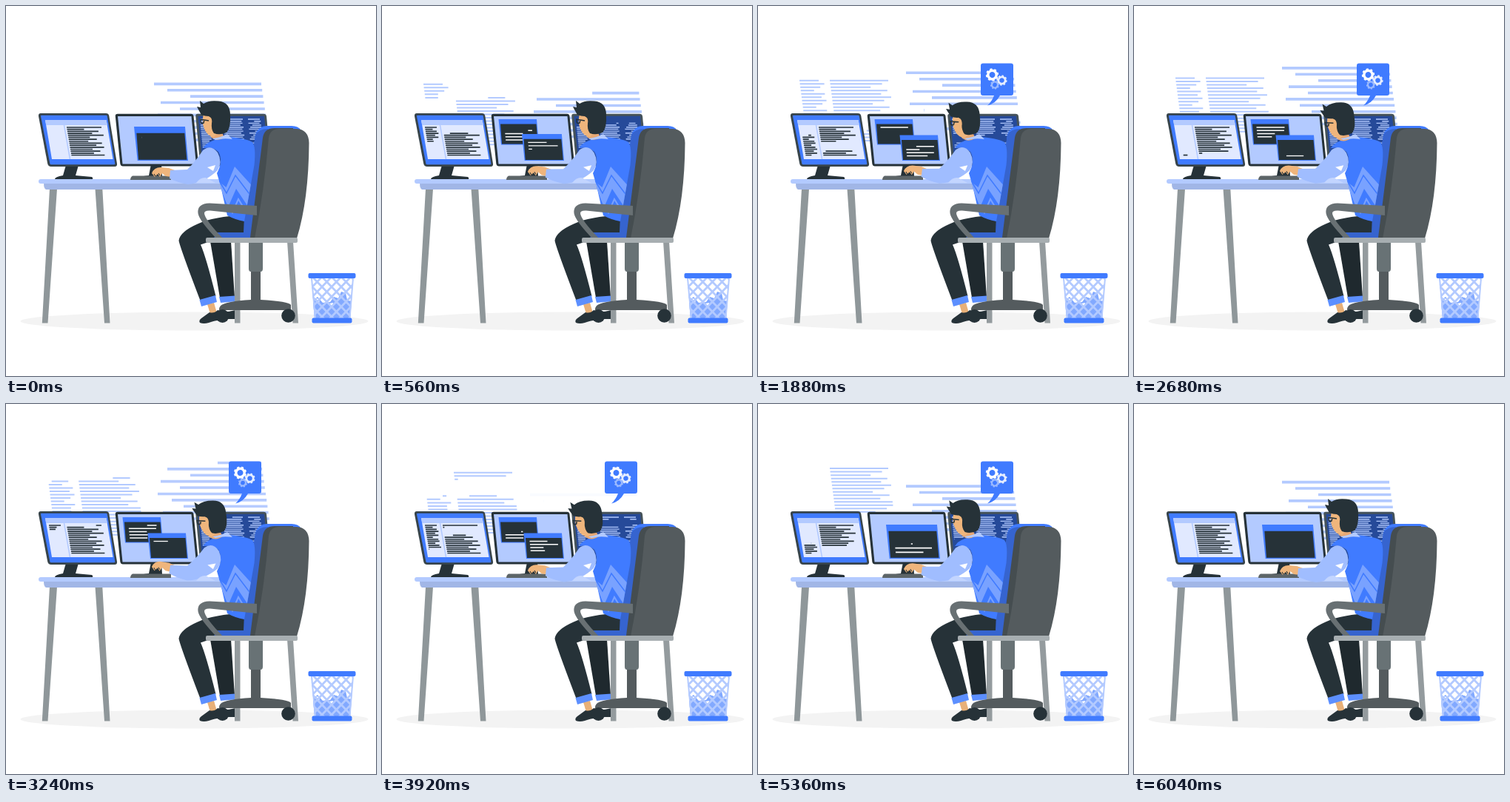
Animation of 500 by 500 pixels, one loop 6080 ms. Source, as an HTML page:

```html
<!DOCTYPE html>
<html lang="en">
<head>
<meta charset="utf-8">
<title>Programmer at a desk</title>
<style>
html, body { margin: 0; width: 100%; height: 100%; overflow: hidden; background: #fff; }
svg { display: block; width: 100vw; height: 100vh; }
</style>
</head>
<body>
<svg id="stage" viewBox="0 0 500 500">
  <defs>
    <clipPath id="basket"><path d="M412 367H469.500L465 423H417Z"/></clipPath>
    <clipPath id="vestClip"><path id="vestShape" d="M270 187Q280 180 297 177Q322 178 333 184Q338 190 335.500 215L322 291Q310 289 299 283L290 243L285 226Q294 209 287 197Q279 190 266 192Z"/></clipPath>
  </defs>

  <ellipse cx="254.500" cy="426" rx="235" ry="12.500" fill="#f3f3f3"/>
  <g id="floatRight"></g>
  <g id="floatLeft"></g>

  <g id="monitors">
    <path d="M81 215H98L94 229L116 231Q118 232 117 234H66Q66 231 77 229Z" fill="#263238"/>
    <path d="M47 145H135Q138.500 145 139.200 148L150 213Q150.500 217 147 217H61Q57 217 56.200 213L44 149Q43.500 145 47 145Z" fill="#37444b"/>
    <path d="M47.500 147.800H135.500Q136.500 147.800 136.800 149L147.300 213Q147.300 214 146.300 214.200H61Q59.800 214.200 59.400 213L47 149Z" fill="#407bff"/>
    <path d="M53 154H135.500L144.500 207H62Z" fill="#e1e9ff"/>
    <path d="M53 154H135.500L137 161H54.200Z" fill="#b3caff"/>
    <path d="M78.500 161L86.500 207" stroke="#b3caff" stroke-width="1.500"/>

    <path d="M196 214H210L211 230H222V234H178Q180 230 193 229Z" fill="#263238"/>
    <path d="M151 145.800H250Q253 145.800 253.500 149L260 213Q260 216.500 257 216.500H158Q155 216.500 154.300 213L147.800 149Q147.500 145.800 151 145.800Z" fill="#263238"/>
    <path d="M151 149H250.500L257 213.500H157.500Z" fill="#b3caff"/>

    <path d="M259 145.800H348Q351.500 145.800 352 149L358 213Q358 216.500 355 216.500H266Q263 216.500 262.300 213L256.300 149Q256 145.800 259 145.800Z" fill="#46535a"/>
    <path d="M259.500 148.800H349L355 213.500H265.500Z" fill="#264a99"/>
  </g>
  <g id="windows"></g>
  <g id="screenText"></g>

  <g id="table">
    <path d="M59 247H69L56.500 428.500H48.800ZM120.500 247H130.300L140.500 428.500H133Z" fill="#8f979a"/>
    <path d="M51 239H300V248H54Q51 247 51 239Z" fill="#a1b6e6"/>
    <rect x="44" y="234" width="262" height="6" rx="3" fill="#b3caff"/>
    <path d="M171 229.500H223V235H168Q168 231 171 229.500Z" fill="#5d6568"/>
  </g>

  <g id="chairBack">
    <path d="M337 174Q341 162 353 162H386Q395 162 399 168L345 313H275Q275 307 283 306L319 304Z" fill="#407bff"/>
    <path d="M337 174Q342 166 354 166L333 313H275Q275 307 283 306L319 304Z" fill="#3664cf"/>
    <path d="M347 178Q349 165 363 165H388L370 313H330Z" fill="#454d50"/>
    <path d="M355 178Q357 166 369 166H393Q409 167 409.500 185Q409 262 393 314H336Q349 250 355 178Z" fill="#545b5e"/>
  </g>

  <g id="rearLeg">
    <path d="M276 318H304L309 394H289Z" fill="#1f292e"/>
    <path d="M288 393L310 391.500L312 399L290 401Z" fill="#5c8fff"/>
    <path d="M287 413Q299 414 310 411L311 423H286Z" fill="#263238"/>
  </g>
  <g id="foot">
    <path d="M272 403L281 401L285 415L276 416Z" fill="#e8b078"/>
    <path d="M275 414Q281 416 286 411L299 414Q300 422 293 424Q281 425 274 428Q267 430 262 428Q260 425 264 422Z" fill="#263238"/>
  </g>
  <path d="M322 283Q281 284 259 294.500Q235 305 233.500 317Q235 326 262.500 398L283.500 392Q270 338 263 322.500L279 317L285 306H321Z" fill="#263238"/>
  <path d="M261.500 397L283 391L285 400L264 406Z" fill="#5c8fff"/>

  <g id="body">
    <use href="#vestShape" fill="#407bff"/>
    <g clip-path="url(#vestClip)">
      <path d="M286 236L297.500 245L309 217L337 248L329 274L311 247L300 272Z" fill="#79a2ff"/>
      <path d="M288 236L298 253L310 229L332 258" fill="none" stroke="#407bff" stroke-width="1.500"/>
      <path d="M297 260L306 279L314 261L328 284" fill="none" stroke="#79a2ff" stroke-width="2"/>
    </g>
  </g>

  <g id="head">
    <path d="M274 168L290 166L295 178Q285 184 277 177Z" fill="#e6a874"/>
    <path d="M267 146Q264 157 268 166Q272 176 281 177L290 168L285 143Z" fill="#efb57c"/>
    <path d="M264 147L260 140L258 136L263 137L262 128L267 132Q274 127 287 128.500Q303 130 303 147Q304 165 298 171Q289 175 281 172Q277 167 278 158Q278 151 274 149Q269 149 264 147Z" fill="#263238"/>
    <ellipse cx="275" cy="156" rx="3.300" ry="6" fill="#efb57c"/>
    <path d="M262 153L274 155M263 153Q262 160 267 158L268 154" fill="none" stroke="#263238" stroke-width="1.500"/>
  </g>
  <path d="M279 179Q290 178 299 173L306 180Q294 178 283 181Z" fill="#b3caff"/>

  <g id="arm">
    <path d="M197 226Q200 218 209 218L220 219L231 223V232L216 230L211 226L208 231L205 227L201 231Z" fill="#efb57c"/>
    <path d="M200 227L202 230M206 226L208 229" stroke="#263238" stroke-width="1"/>
    <path d="M222 222L245 221Q257 209 266 195Q277 186 286 198Q293 211 286 222Q268 239 246 241Q230 238 221 233Z" fill="#a0bdff"/>
    <path d="M272 218L283 215L280 223Z" fill="#fff"/>
  </g>
  <path d="M257 239Q263 231 270 232L283 239Z" fill="#c3d5ff"/>

  <g id="chairFront">
    <path d="M339 270L275 266.500Q258 267 259.500 280Q261 290 285 315H294Q268 288 268 280Q268 276 276 276.500L339 283Z" fill="#687073"/>
    <path d="M309 318H316.500V428.500H309ZM380 318H388L395 428.500H387.500Z" fill="#949b9e"/>
    <path d="M331 355H344V400H331Z" fill="#545b5e"/>
    <path d="M328 319H347V355Q347 359 344 359H331Q328 359 328 355Z" fill="#687275"/>
    <rect x="270" y="313" width="124" height="7" rx="2" fill="#a7aeb1"/>
    <path d="M290 405Q297 399 331 397H344Q382 399 385 404V411H288Q288 407 290 405Z" fill="#545b5e"/>
    <circle cx="292.500" cy="419" r="9" fill="#263238"/>
    <circle cx="381.500" cy="418.500" r="9.300" fill="#263238"/>
  </g>

  <g id="bin">
    <g clip-path="url(#basket)">
      <path d="M415 398L421 393L428 401L438 400L443 393L449 395L453 386L459 388L461 397L469 400V424H415Z" fill="#82a9ff"/>
      <path d="M419 395L424 396L423 402ZM437 402L442 401L441 408ZM461 395L465 394L464 399Z" fill="#fff"/>
      <path id="lattice" fill="none" stroke="#b3caff" stroke-width="2.800"/>
    </g>
    <path d="M413 368L418 422M469 368L464.500 422" stroke="#b3caff" stroke-width="2"/>
    <rect x="408.500" y="361" width="64" height="7" rx="2" fill="#407bff"/>
    <rect x="413.500" y="421.500" width="54" height="7" rx="2" fill="#407bff"/>
  </g>

  <g id="bubble">
    <path d="M304 77.500H342Q345 77.500 345 80.500V118Q345 121 342 121H327Q321 132 310 134.500Q316 129 319 121H304Q301 121 301 118V80.500Q301 77.500 304 77.500Z" fill="#407bff"/>
  </g>
</svg>
<script>
const LOOP = 6080, HALF = LOOP / 2;
const $ = id => document.getElementById(id);
const clamp = v => Math.max(0, Math.min(1, v));
const ease = v => (v = clamp(v), v * v * (3 - 2 * v));
const ramp = (t, from, to) => ease((t - from) / (to - from));
const front = (t, start, linesPerSecond) => Math.max(0, (t - start) * linesPerSecond / 1000);

function add(parent, name, attrs) {
  const el = document.createElementNS('http://www.w3.org/2000/svg', name);
  for (const key in attrs) el.setAttribute(key, attrs[key]);
  return parent.appendChild(el);
}

function track(t, keys) {
  for (let i = 1; i < keys.length; i++) {
    const [t0, a] = keys[i - 1], [t1, b] = keys[i];
    if (t <= t1) return a + (b - a) * ramp(t, t0, t1);
  }
  return keys[keys.length - 1][1];
}

// Rows are [indent, length]; the left margin follows the slant of the screen.
function textBlock(parent, { x, y, step, slant, rows, color, width }) {
  const path = add(parent, 'path', { fill: 'none', stroke: color, 'stroke-width': width });
  const lines = rows.map(([indent, length], i) => [x + indent + slant * step * i, y + step * i, length]);
  const draw = spans => path.setAttribute('d', lines.map(([left, top, length], i) =>
    spans(i).map(([a, b]) => b > a
      ? `M${(left + a * length).toFixed(2)} ${top.toFixed(2)}H${(left + b * length).toFixed(2)}` : '').join('')).join(''));
  return {
    path,
    retype: (typed, erased) => draw(i => {
      const a = clamp(typed - i), b = clamp(erased - i);
      return a >= b ? [[0, 1]] : [[0, a], [b, 1]];
    }),
    show: (typed, erased) => draw(i => [[clamp(erased - i), clamp(typed - i)]])
  };
}

const flush = lengths => lengths.map(length => [0, length]);
const repeat = (list, n) => Array.from({ length: n }, (_, i) => list[i % list.length]);

const rightStarts = [200, 218, 249, 209, 235, 205, 224, 240, 212, 230];
const floatRight = textBlock($('floatRight'), {
  x: 0, y: 0, step: 8.4, slant: 0, color: '#b3caff', width: 3.6,
  rows: rightStarts.map((start, i) => [start, 345 + i * 1.2 - start])
});
const floatStyle = { y: 0, step: 4.52, slant: .13, color: '#b3caff', width: 2 };
const floatNav = textBlock($('floatLeft'), {
  ...floatStyle, x: 56, rows: flush(repeat([26, 33, 27, 18, 32, 27, 33, 27, 18, 32, 26], 19))
});
const floatMain = textBlock($('floatLeft'), {
  ...floatStyle, x: 97, rows: flush(repeat([79, 70, 54, 76, 67, 80, 70, 54, 76, 63, 79], 19))
});

const texts = $('screenText');
const codeStyle = { y: 164, step: 2.68, slant: .17, color: '#263238', width: 1.7 };
const nav = textBlock(texts, {
  ...codeStyle, x: 58, rows: flush(repeat([16, 10, 15, 17, 12, 16, 8, 15], 15))
});
const main = textBlock(texts, {
  ...codeStyle, x: 82, rows: flush([47, 23, 42, 33, 48, 29, 38, 26, 44, 36, 46, 30, 40, 31, 45])
});

const sideStyle = { y: 153, step: 2.68, slant: .1, color: '#b3caff', width: 1.4 };
const sideColumns = [
  textBlock(texts, { ...sideStyle, x: 262, rows: flush(repeat([13, 10, 15, 12, 17], 15)) }),
  textBlock(texts, { ...sideStyle, x: 293, rows: flush(repeat([27, 25, 26, 23], 15)) }),
  textBlock(texts, { ...sideStyle, x: 327, rows: repeat([[0, 16], [8, 9], [0, 15], [5, 12], [2, 15]], 15) })
];

// A console window drawn in its own small coordinates.
function consoleWindow(rows) {
  const group = add($('windows'), 'g', {});
  add(group, 'path', { d: 'M0 0H51.500L54.500 34.500H3.500Z', fill: '#407bff' });
  add(group, 'path', { d: 'M2.500 6.500H51L53.300 33.500H4.500Z', fill: '#263238' });
  const text = textBlock(group, { x: 8, y: 11, step: 4.25, slant: .1, rows, color: '#fff', width: 1.3 });
  return { group, text };
}
const backWindow = consoleWindow(flush([38, 37, 24, 25, 24]));
const frontWindow = consoleWindow(flush([24, 38, 18, 37, 28]));

function gear(cx, cy, r, teeth, fill) {
  const g = add($('bubble'), 'g', {});
  add(g, 'circle', { r: r * .67, fill: 'none', stroke: fill, 'stroke-width': r * .4 });
  add(g, 'circle', {
    r: r * .9, fill: 'none', stroke: fill, 'stroke-width': r * .24, pathLength: teeth * 2, 'stroke-dasharray': '1 1'
  });
  return angle => g.setAttribute('transform', `translate(${cx} ${cy}) rotate(${angle})`);
}
const gears = [
  gear(316.5, 93, 8.5, 8, '#fff'),
  gear(329.5, 100.5, 7, 8, '#e6eeff'),
  gear(320, 106.5, 6, 8, '#9bbaff')
];

let mesh = '';
for (let x = 349; x < 530; x += 13) mesh += `M${x} 366L${x + 56} 424M${x} 366L${x - 56} 424`;
$('lattice').setAttribute('d', mesh);

const headKeys = [[0, 0], [900, 0], [1120, -.6], [1880, -3.8], [2500, -6.3], [4900, -6.5], [5800, 0], [LOOP, 0]];
const handKeys = [[0, 0], [560, 2], [1120, 7], [1880, 3], [2680, 3], [3300, 6], [3920, 1], [4720, 7], [5400, 3], [LOOP, 0]];
const footKeys = [[0, 0], [650, 0], [1100, 6], [1550, 0], [LOOP, 0]];

function render(t) {
  const u = t % HALF;

  const rise = (t - 3850 + LOOP) % LOOP;
  $('floatRight').setAttribute('transform', `translate(0 ${123.2 - rise * .008})`);
  $('floatRight').setAttribute('opacity', ramp(rise, 0, 400) * (1 - ramp(rise, 5400, 5900)));
  floatRight.retype(front(u, 680, 5), front(u, 80, 4.9));

  $('floatLeft').setAttribute('transform', `translate(0 ${108 - t * .0039})`);
  $('floatLeft').setAttribute('opacity', 1 - ramp(t, 5500, 5950));
  floatNav.show(front(t, 20, 8.4), front(t, 2980, 8.3));
  floatMain.retype(front(u, 630, 8.3), front(u, 0, 8.3));
  floatMain.path.setAttribute('opacity', ramp(t, 100, 600));

  nav.show(front(u, 20, 14), front(u, 1490, 12));
  main.retype(front(u, 720, 6.7), front(u, 75, 6.7));
  sideColumns.forEach((column, i) => column.retype(front(u, 720 - i * 60, 6.9), front(u, 60 + i * 70, 6.7)));

  const grow = 1 - ramp(t, 100, 700) + ramp(t, 4350, 4950);
  const left = 191.5 - 18.5 * grow, top = 174.5 - 11.5 * grow;
  frontWindow.group.setAttribute('transform',
    `translate(${left} ${top}) scale(${(246 - left) / 54.5} ${(209 - top) / 34.5})`);
  frontWindow.text.show(front(u, 0, 4), front(u, 1490, 3.5));
  const open = ramp(t, 150, 500) * (1 - ramp(t, 5150, 5450));
  backWindow.group.setAttribute('transform',
    `translate(${185 - 27.5 * open} ${170.5 - 17.5 * open}) scale(${open})`);
  if (u < 1500) backWindow.text.retype(0, front(u, 0, 3.3));
  else backWindow.text.show(front(u, 1600, 3.5), 0);

  const nod = track(t, headKeys);
  $('head').setAttribute('transform', `translate(${nod * .3} ${-nod * .3}) rotate(${nod} 284 180)`);
  $('arm').setAttribute('transform', `rotate(${track(t, handKeys) * .72} 278 222)`);
  $('foot').setAttribute('transform', `rotate(${track(t, footKeys)} 292 414)`);

  const pop = ramp(t, 600, 800) * (1 - ramp(t, 5650, 5850));
  $('bubble').setAttribute('transform', `translate(312 134) scale(${pop}) translate(-312 -134)`);
  const turn = t / LOOP * 360;
  gears.forEach((spin, i) => spin(i === 1 ? 22 - turn : turn));
}

const began = performance.now();
function tick() {
  render((performance.now() - began) % LOOP);
  requestAnimationFrame(tick);
}
tick();
</script>
</body>
</html>
```
